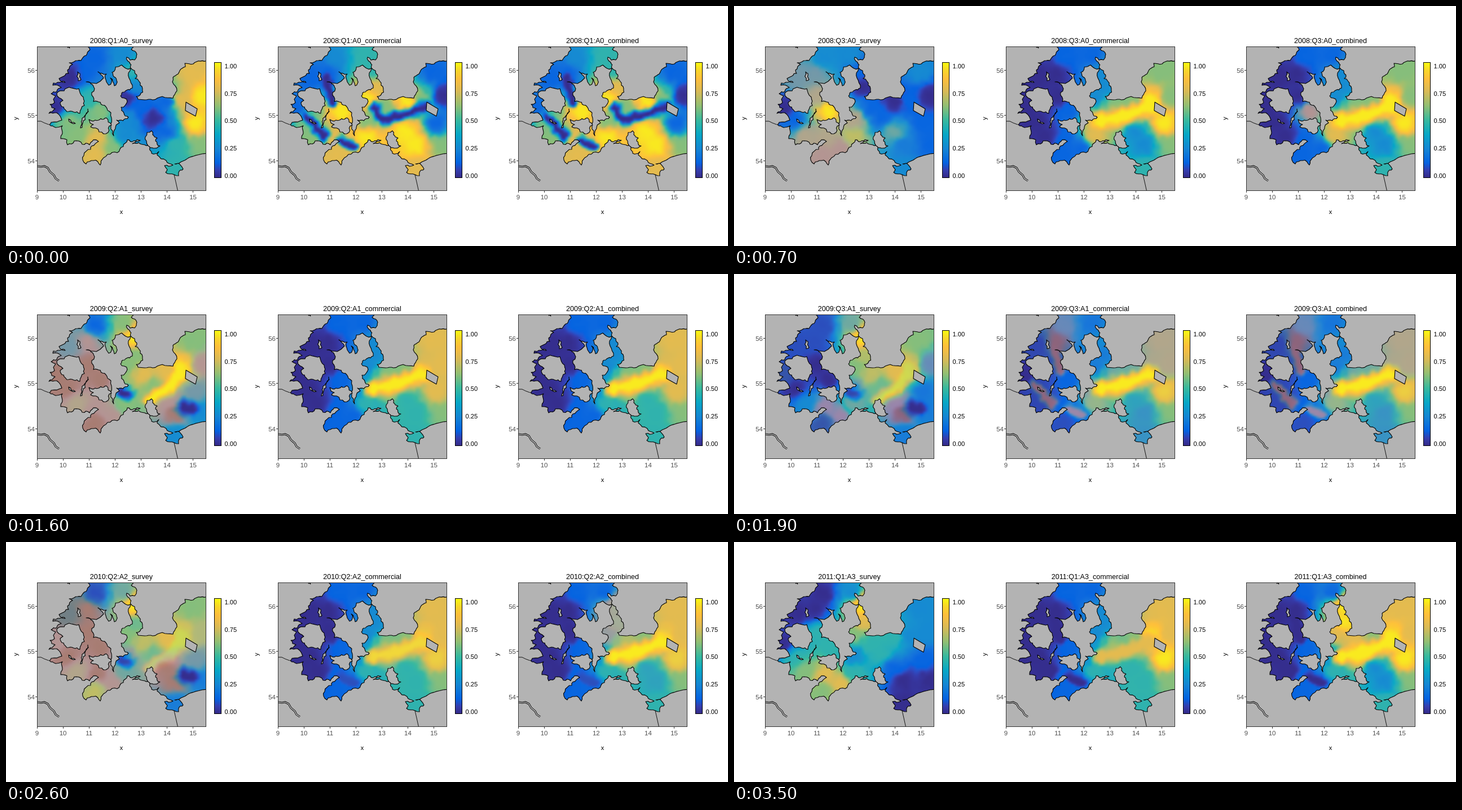
Recreate the animation shown at these times as an HTML page with a canvas. Size 1280 by 427 pixels, loop 3.6 s.

```html
<!DOCTYPE html>
<html lang="en">
<head>
<meta charset="utf-8">
<title>Quarterly abundance maps</title>
<style>
html, body { margin: 0; width: 100%; height: 100%; overflow: hidden; background: #fff; }
canvas, svg { position: absolute; left: 0; top: 0; display: block; }
text { font-family: "Liberation Sans", Arial, sans-serif; }
</style>
</head>
<body>
<canvas id="sea" width="1280" height="427"></canvas>
<svg id="chart" width="1280" height="427" viewBox="0 0 1280 427"></svg>
<script>
const STEP = 100, FRAMES = 36;
const X0 = 55, Y0 = 72, W = 300, H = 257, COLS = 75, ROWS = 64;
const KINDS = ["survey", "commercial", "combined"];
const shift = i => Math.round(i * 1280 / 3);

// ---- colour: ramp stops and Lab mixing ----
const RAMP = [[0, "352A87"], [.065, "353EAF"], [.13, "0363E1"], [.25, "1485D4"], [.375, "06A7C6"], [.5, "38B99E"],
  [.625, "92BF73"], [.75, "D9BA56"], [.86, "FEBF3B"], [.93, "F9D52A"], [1, "F9FB0E"]];
const toLin = c => c <= .04045 ? c / 12.92 : ((c + .055) / 1.055) ** 2.4;
const toByte = c => 255 * (c <= .0031308 ? 12.92 * c : 1.055 * c ** (1 / 2.4) - .055);
const squash = t => t > .008856 ? Math.cbrt(t) : 7.787 * t + 16 / 116;
const expand = t => t > .2069 ? t ** 3 : (t - 16 / 116) / 7.787;
const lerp = (a, b, u) => a + (b - a) * u;

function hexToLab(hex) {
  const [r, g, b] = [0, 2, 4].map(i => toLin(parseInt(hex.slice(i, i + 2), 16) / 255));
  const x = squash((.4124 * r + .3576 * g + .1805 * b) / .9505);
  const y = squash(.2126 * r + .7152 * g + .0722 * b);
  const z = squash((.0193 * r + .1192 * g + .9505 * b) / 1.089);
  return [116 * y - 16, 500 * (x - y), 200 * (y - z)];
}
function labToRgb([l, a, b]) {
  const f = (l + 16) / 116;
  const x = .9505 * expand(f + a / 500), y = expand(f), z = 1.089 * expand(f - b / 200);
  return [3.2406 * x - 1.5372 * y - .4986 * z, -.9689 * x + 1.8758 * y + .0415 * z,
    .0557 * x - .204 * y + 1.057 * z].map(toByte);
}
const LAB = RAMP.map(([at, hex]) => [at, hexToLab(hex)]);
const PALETTE = Array.from({ length: 257 }, (_, i) => {
  const v = i / 256, k = Math.max(1, LAB.findIndex(s => s[0] >= v));
  const [a, from] = LAB[k - 1], [b, to] = LAB[k];
  return from.map((c, j) => lerp(c, to[j], (v - a) / (b - a)));
});

// ---- sea regions, and narrow features laid over them ----
const PLACES = {
  kattegat: [160, 92], laholm: [208, 90], aarhus: [115, 128], samso: [145, 120], belt: [148, 160], lillebelt: [90, 180],
  als: [108, 205], kiel: [125, 232], lubeck: [156, 266], smaland: [168, 187], fehmarn: [160, 236], rostock: [187, 253],
  oresund: [224, 112], malmo: [230, 143], koge: [213, 163], mon: [212, 203], darss: [212, 230], trelleborg: [245, 178],
  arkona: [260, 200], ystad: [283, 170], rugen: [283, 225], gat: [312, 168], hano: [330, 118], east: [348, 160],
  bornholm: [335, 208], oder: [300, 248], szczecin: [297, 288], pomerania: [345, 245]
};
const FEATURES = {
  belts: { width: 9, paths: ["140,128 153,172", "104,198 137,231", "166,238 188,251"] },
  trough: { width: 11, paths: ["190,248 225,226 240,207 290,188 322,165 345,166"] },
  basin: { width: 10, paths: ["228,183 240,204 292,190 318,178"] },
  bank: { width: 15, paths: ["224,204 262,197 312,178"] },
  slope: { width: 12, paths: ["255,224 285,205 308,180"] },
  hollow: { width: 10, paths: ["205,208 217,213"] },
  shoal: { width: 14, paths: ["314,237 326,238"] }
};
const LEVELS = { dark: .01, blue: .14, azure: .27, teal: .45, green: .6, gold: .78, yellow: .97 };

const WINTER = `teal: laholm oresund; azure: kattegat; blue: aarhus samso lillebelt hano bornholm; dark: east;
  green: kiel als trelleborg mon gat pomerania; gold: lubeck fehmarn malmo szczecin; yellow: smaland koge ystad darss oder rugen;`;
const SUMMER = `dark: aarhus samso belt lillebelt als kiel; blue: kattegat laholm lubeck fehmarn smaland rostock;
  azure: koge mon oresund malmo; green: trelleborg ystad hano east pomerania; teal: darss rugen oder szczecin;
  gold: gat bornholm arkona; yellow: bank;`;
const LATE = SUMMER + "gold: hano east; yellow: gat bornholm; teal: arkona;";

const SURVEY = {
  "08Q1": `dark: aarhus lillebelt koge arkona; blue: kattegat samso trelleborg rugen ystad; azure: laholm malmo mon darss;
    teal: belt oresund oder szczecin; green: als kiel smaland rostock pomerania; gold: lubeck fehmarn gat hano; yellow: east bornholm`,
  "08Q3": `dark: lillebelt malmo ystad east; blue: als oresund arkona gat bornholm pomerania trelleborg; azure: kattegat laholm hano szczecin oder;
    green: aarhus samso rugen; gold: belt kiel lubeck fehmarn rostock mon darss; yellow: smaland`,
  "09Q1": `dark: kattegat oder szczecin pomerania bornholm; blue: hano east; azure: laholm koge malmo gat; teal: aarhus samso belt kiel trelleborg arkona ystad rugen;
    green: lillebelt als smaland darss; gold: lubeck fehmarn oresund slope; yellow: rostock; blue: hollow`,
  "09Q2": `blue: kattegat; azure: szczecin pomerania; green: laholm malmo koge darss hano arkona bornholm aarhus;
    gold: samso belt lillebelt als kiel lubeck smaland fehmarn rostock trelleborg ystad rugen east oder; yellow: oresund gat slope; dark: hollow shoal`,
  "09Q4": `dark: aarhus samso belt smaland als kattegat; blue: mon szczecin pomerania; azure: laholm lillebelt kiel lubeck darss bornholm;
    teal: arkona; green: trelleborg koge gat hano east; gold: fehmarn rostock malmo ystad rugen oder; yellow: oresund; dark: shoal`,
  "10Q3": `dark: aarhus als lubeck fehmarn; blue: kattegat samso belt lillebelt kiel smaland rostock mon darss; azure: laholm;
    teal: koge; green: malmo trelleborg hano east pomerania; gold: arkona rugen bornholm oder szczecin; yellow: oresund ystad gat slope`,
  "11Q1": `dark: kattegat aarhus samso lillebelt oder szczecin pomerania; blue: rugen bornholm; azure: laholm hano east gat mon;
    teal: belt als smaland darss trelleborg arkona ystad; green: kiel lubeck koge; gold: fehmarn rostock malmo; yellow: oresund`
};
const COMMERCIAL = {
  "08Q1": WINTER + "dark: belts basin",
  "08Q3": SUMMER + "yellow: bornholm gat; azure: rugen oder; gold: darss mon",
  "09Q1": WINTER + "blue: kattegat; azure: laholm; green: malmo oresund darss; gold: gat smaland; teal: hano east; dark: belts trough",
  "09Q2": SUMMER + "gold: hano east",
  "09Q4": SUMMER + `azure: laholm oresund hano ystad trelleborg rugen east gat; blue: aarhus koge malmo oder szczecin rostock fehmarn belt kiel als;
    green: kattegat pomerania; gold: samso darss mon; yellow: bornholm; dark: lubeck; gold: belts`,
  "10Q3": LATE,
  "11Q1": LATE + "dark: belts; gold: bank"
};
// Quarters that change part of another one
SURVEY["08Q4"] = SURVEY["08Q3"] + "; blue: samso aarhus lubeck rostock oder; azure: belt kiel fehmarn rugen mon; green: darss";
SURVEY["09Q3"] = SURVEY["09Q2"] + `; dark: belt lillebelt als smaland lubeck oder; blue: aarhus samso fehmarn rostock rugen east bornholm;
  azure: kiel`;
SURVEY["10Q1"] = SURVEY["09Q4"] + "; dark: fehmarn rugen oder; blue: rostock lillebelt bornholm; green: lubeck; teal: malmo east";
COMMERCIAL["10Q1"] = COMMERCIAL["11Q1"];
const COMBINED = { ...COMMERCIAL };
COMBINED["08Q3"] += "; gold: smaland";
COMBINED["08Q4"] = COMMERCIAL["08Q3"];
for (const q of ["10Q1", "11Q1"])
  COMBINED[q] += "; yellow: oresund malmo arkona bank; gold: koge trelleborg east; azure: rugen oder";

const quarterName = k => `${String(8 + Math.floor(k / 4)).padStart(2, "0")}Q${k % 4 + 1}`;
// A quarter without its own field borrows one from the same season
function lookup(set, k) {
  return set[quarterName(k)] || set[quarterName(k % 4 == 3 && k < 4 ? 2 : k % 4 + 4)] || set["09Q2"];
}

const points = text => text.trim().split(/\s+/).map(p => p.split(",").map(Number));
const pairs = pts => pts.slice(1).map((p, i) => [pts[i], p]);
for (const f of Object.values(FEATURES)) f.parts = f.paths.flatMap(p => pairs(points(p)));

function distance(x, y, [[ax, ay], [bx, by]]) {
  const dx = bx - ax, dy = by - ay;
  const u = Math.max(0, Math.min(1, ((x - ax) * dx + (y - ay) * dy) / (dx * dx + dy * dy)));
  return Math.hypot(x - ax - u * dx, y - ay - u * dy);
}
function parse(text) {
  const spots = {}, ridges = {};
  for (const clause of text.split(";").filter(s => s.trim())) {
    const [level, names] = clause.split(":");
    for (const name of names.trim().split(/\s+/)) {
      const set = FEATURES[name] ? ridges : spots;
      delete set[name];
      set[name] = LEVELS[level.trim()];
    }
  }
  return { spots: Object.entries(spots).map(([n, v]) => [...PLACES[n], v]),
    ridges: Object.entries(ridges).map(([n, v]) => [FEATURES[n], v]) };
}

// Smooth lattice noise gives the patchy edges
const hash = (i, j) => { const s = Math.sin(i * 127.1 + j * 311.7) * 43758.5; return s - Math.floor(s) - .5; };
function noise(x, y) {
  const i = Math.floor(x), j = Math.floor(y), u = x - i, v = y - j;
  return lerp(lerp(hash(i, j), hash(i + 1, j), u), lerp(hash(i, j + 1), hash(i + 1, j + 1), u), v);
}
const cells = Array.from({ length: COLS * ROWS }, (_, i) => {
  const x = X0 + (i % COLS + .5) * W / COLS, y = Y0 + (Math.floor(i / COLS) + .5) * H / ROWS;
  return [x + 8 * noise(x / 9, y / 9), y + 8 * noise(y / 9 + 40, x / 9)];
});
const cache = {};
// Inverse-distance weighting of the regions, then the features on top
function solve(text) {
  if (cache[text]) return cache[text];
  const { spots, ridges } = parse(text);
  return cache[text] = cells.map(([x, y]) => {
    let sum = 0, value = 0;
    for (const [px, py, v] of spots) {
      const w = ((x - px) ** 2 + (y - py) ** 2 + 80) ** -1.8;
      sum += w;
      value += w * v;
    }
    value /= sum;
    for (const [{ width, parts }, v] of ridges) {
      const d = Math.min(...parts.map(p => distance(x, y, p)));
      value = lerp(value, v, Math.exp(-((d / width) ** 3)));
    }
    return Math.round(256 * value);
  });
}
const fields = [SURVEY, COMMERCIAL, COMBINED].map(set => Array.from({ length: 13 }, (_, k) => solve(lookup(set, k))));

// ---- coast: key points with shores frayed between them ----
let seed = 7;
const random = () => (seed = seed * 16807 % 2147483647) / 2147483647 - .5;
function fray(a, b, amount) {
  const dx = b[0] - a[0], dy = b[1] - a[1];
  if (Math.hypot(dx, dy) < 5) return [a];
  const k = amount * random(), mid = [(a[0] + b[0]) / 2 - k * dy, (a[1] + b[1]) / 2 + k * dx];
  return [...fray(a, mid, amount), ...fray(mid, b, amount)];
}
function shore(text, amount = .45) {
  const pts = points(text);
  return [...pairs(pts).flatMap(([a, b]) => fray(a, b, amount)), pts[pts.length - 1]]
    .map(p => p.map(c => c.toFixed(1)).join()).join(" ");
}
const JUTLAND = `146,66 142,88 133,97 121,99 112,101 118,104 109,114 111,120 94,129 105,136 84,137 83,141 98,145 80,156 88,160
  84,166 86,172 78,175 87,183 76,191 90,190 99,203 80,207 77,211 100,213 100,226 97,236 108,238 109,247 121,240 135,246 148,247`;
const BALTIC = `150,243 155,238 164,241 152,249 150,255 138,266 136,274 142,281 155,275 167,283 173,270 180,264 197,261 208,250
  215,238 238,239 224,245 246,247 258,262 271,259 268,265 284,275 296,283 281,284 286,291 283,296 298,300 306,302 306,296 314,290 299,281`;
const POLAND = "306,280 324,270 348,263 362,261";
const SWEDEN = `226,66 222,77 232,86 228,96 214,91 219,100 228,115 232,123 229,129 238,141 242,147 238,158 231,161 234,166`;
const SCANIA = "246,167 260,167 277,161 296,164 303,151 295,135 296,127 305,121 308,115 318,108 317,102 332,103 338,99 365,99";
const ISLANDS = [
  `152,154 157,147 142,135 160,138 167,134 173,128 163,117 178,121 178,135 182,141 187,136 185,128 192,142 196,138 188,118 205,105
   221,111 217,119 218,128 224,146 205,155 203,160 215,170 204,180 217,198 196,203 201,208 191,231 186,214 187,199 186,190 177,179 155,170 152,154`,
  "147,202 158,203 178,199 187,212 181,225 165,224 150,215 155,211 147,202",
  "90,155 103,151 129,147 137,162 139,177 131,191 108,188 96,172 101,168 90,155",
  "249,240 247,233 258,222 260,229 268,235 265,240 273,249 261,253 249,240",
  "127,117 131,120 133,131 128,133 127,117",
  "145,183 146,188 135,216 132,217 139,196 145,183",
  "111,201 123,209 116,208 111,201"
];
const land = [
  shore(JUTLAND) + " " + shore(BALTIC) + " " + shore(POLAND, .08) + " 362,340 45,340 45,66",
  shore(SWEDEN) + " " + shore(SCANIA, .25) + " 365,66",
  ...ISLANDS.map(s => shore(s)),
  "319,171 339,183 336,196 318,186"
].map(p => `<polygon points="${p}"/>`).join("");
const line = (path, color, width) =>
  `<polyline points="${path}" fill="none" stroke="${color}" stroke-width="${width}"/>`;
const RIVER = "50,284 62,286 68,285 74,288 78,295 85,301 88,307 94,311";

// ---- static chart ----
const label = (x, y, text, size, fill, anchor = "middle", more = "") =>
  `<text x="${x}" y="${y}" font-size="${size}" fill="${fill}" text-anchor="${anchor}" ${more}>${text}</text>`;
const tick = (x, y, dx, dy) => `<path d="M${x} ${y}l${dx} ${dy}" stroke="#333"/>`;

function panel(i) {
  let s = `<g transform="translate(${shift(i)})"><use href="#land"/>
    <rect x="55.5" y="72.5" width="299" height="256" fill="none" stroke="#333"/>`;
  for (let k = 0; k < 7; k++) {
    const x = X0 + 46.1 * k;
    s += tick(Math.floor(x) + .5, 329, 0, 3) + label(x, 344, 9 + k, 11.5, "#4d4d4d");
  }
  for (let k = 0; k < 3; k++) {
    const y = 114.5 + 80.4 * k;
    s += tick(55, Math.floor(y) + .5, -3, 0) + label(51, y + 4.4, 56 - k, 11.5, "#4d4d4d", "end");
  }
  s += label(204.5, 370, "x", 11, "#000") + label(0, 0, "y", 11, "#000", "middle", 'transform="translate(21 200) rotate(-90)"');
  s += '<rect x="369.5" y="100.5" width="12" height="205" fill="url(#ramp)" stroke="#000"/>';
  for (let k = 0; k < 5; k++) s += label(387.5, 111 + 48.65 * k, (1 - k / 4).toFixed(2), 11.2, "#000", "start");
  return s + label(204.5, 66, "", 12.6, "#000", "middle", 'class="title"') + "</g>";
}
const chart = document.getElementById("chart");
chart.innerHTML = `<defs>
  <linearGradient id="ramp" x1="0" y1="1" x2="0" y2="0">
    ${RAMP.map(([at, hex]) => `<stop offset="${at}" stop-color="#${hex}"/>`).join("")}</linearGradient>
  <clipPath id="frame"><rect x="${X0}" y="${Y0}" width="${W}" height="${H}"/></clipPath>
  <g id="land" clip-path="url(#frame)">
    <g fill="#b3b3b3" stroke="#000" stroke-width="1.1" stroke-linejoin="round">${land}</g>
    ${line(RIVER, "#000", 3.2)}${line(RIVER, "#e4e4e4", 1.2)}
    ${line("50,205 62,205 68,208 76,211", "#000", .9)}${line("298,300 301,313 305,331", "#000", .9)}
    ${line("109,74 111,72 113,75", "#000", 1.5)}
  </g></defs>` + KINDS.map((_, i) => panel(i)).join("");
const titles = chart.querySelectorAll(".title");

// ---- animation ----
const ctx = document.getElementById("sea").getContext("2d");
const tile = document.createElement("canvas");
tile.width = COLS;
tile.height = ROWS;
const pen = tile.getContext("2d"), image = pen.createImageData(COLS, ROWS);
ctx.imageSmoothingQuality = "high";

function draw(frame) {
  // Three frames per quarter; the last quarter is reached in two
  const at = frame < 33 ? frame / 3 : 11 + (frame - 33) / 2;
  const k = Math.floor(at), q = Math.round(at), year = Math.floor(q / 4);
  const u = at - k, mix = u && .5 + (u - .5) / 2;
  KINDS.forEach((kind, i) => {
    const from = fields[i][k], to = fields[i][Math.min(k + 1, 12)];
    from.forEach((v, c) => {
      const a = PALETTE[v], b = PALETTE[to[c]];
      image.data.set([...labToRgb(a.map((p, j) => lerp(p, b[j], mix))).map(p => p || 0), 255], 4 * c);
    });
    pen.putImageData(image, 0, 0);
    ctx.drawImage(tile, X0 + shift(i), Y0, W, H);
    titles[i].textContent = `${2008 + year}:Q${q % 4 + 1}:A${year}_${kind}`;
  });
}
let shown = -1;
const start = performance.now();
function loop() {
  const frame = Math.floor((performance.now() - start) / STEP) % FRAMES;
  if (frame !== shown) draw(shown = frame);
  requestAnimationFrame(loop);
}
loop();
</script>
</body>
</html>
```
